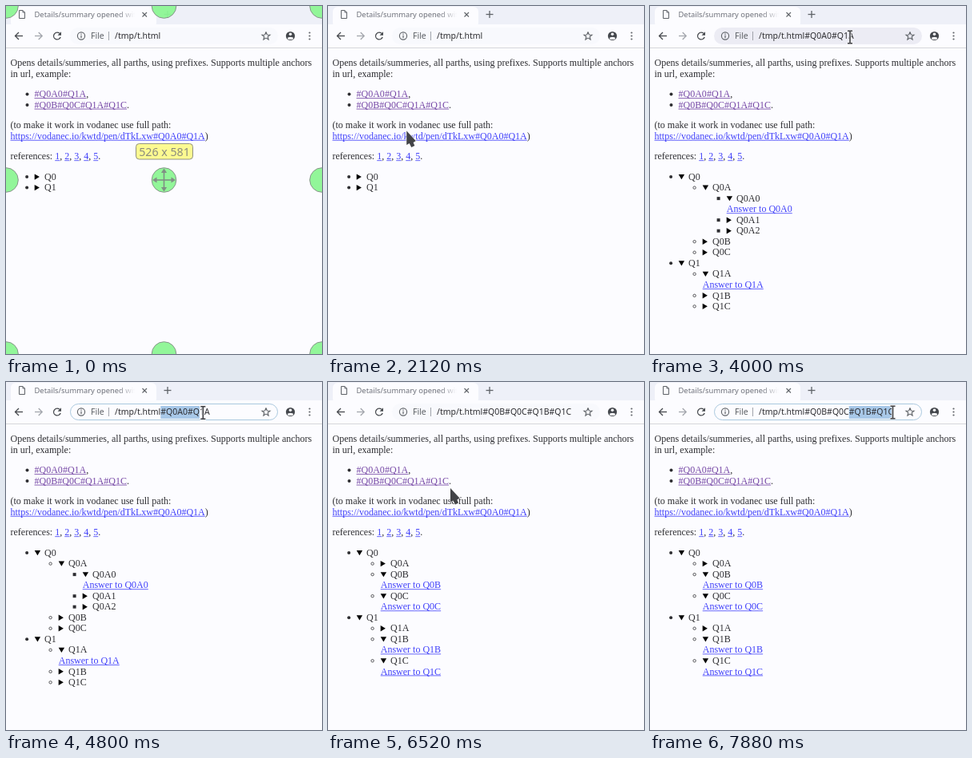
Write an HTML page with a canvas that moves like this. It is 395 px wide and 436 px high and loops after 8 s.

```html
<!DOCTYPE html>
<html lang="en">
<head>
<meta charset="utf-8">
<title>Details/summary</title>
<style>
html, body { margin: 0; width: 395px; height: 436px; overflow: hidden; background: #fcfcff; }
canvas { display: block; }
</style>
</head>
<body>
<canvas id="stage" width="395" height="436"></canvas>
<script>
const ctx = document.getElementById('stage').getContext('2d');
const LOOP = 8000, STEP = 40, LINE = 13.52, LEFT = 5.5;
const SERIF = '12.02px "Liberation Serif", "Times New Roman", serif';
const sans = size => size + 'px "Noto Sans", "Open Sans", sans-serif';
const INK = '#2e2e32', GREY = '#5f6368', BLUE = '#4040fa', PURPLE = '#7648a6', PAPER = '#fcfcff';
const URL_X = 136, URL_FONT = sans(10.51);

// depth, state, label: o = open, c = closed, a = answer link
const TREES = [
  ['0cQ0', '0cQ1'],
  ['0oQ0', '1oQ0A', '2oQ0A0', '2aQ0A0', '2cQ0A1', '2cQ0A2', '1cQ0B', '1cQ0C',
   '0oQ1', '1oQ1A', '1aQ1A', '1cQ1B', '1cQ1C'],
  ['0oQ0', '1cQ0A', '1oQ0B', '1aQ0B', '1oQ0C', '1aQ0C',
   '0oQ1', '1cQ1A', '1oQ1B', '1aQ1B', '1oQ1C', '1aQ1C']
];
const HASHES = ['', '#Q0A0#Q1A', '#Q0B#Q0C#Q1B#Q1C'];

// pointer path: time, x, y
const PATH = [
  [1040, 250, 445], [1400, 156, 305.5], [1800, 105, 185], [1880, 105, 185],
  [2520, 87, 109], [3600, 87, 109], [4000, 250, 39], [4360, 194, 39],
  [4720, 194, 39], [4800, 246.3, 38.5], [4880, 257, 39], [4920, 257, 39],
  [5360, 145, 125], [6320, 145, 125], [6520, 153, 133], [7120, 249, 39],
  [7160, 249, 39], [7880, 303.5, 38], [8000, 303.5, 38]
];

function pointer(t) {
  if (t < PATH[0][0]) return null;
  const i = PATH.findIndex(p => p[0] > t);
  const a = PATH[i - 1], b = PATH[i];
  const k = (t - a[0]) / (b[0] - a[0]);
  return { x: a[1] + (b[1] - a[1]) * k, y: a[2] + (b[2] - a[2]) * k };
}

function text(str, x, y, color, font) {
  ctx.font = font;
  ctx.fillStyle = color;
  ctx.fillText(str, x, y);
  return x + ctx.measureText(str).width;
}
const body = (str, x, y) => text(str, x, y, INK, SERIF);
function link(str, x, y, color = BLUE) {
  const end = text(str, x, y, color, SERIF);
  ctx.fillRect(x, y + 1, end - x, 0.8);
  return end;
}

function line(points, color, width = 1.3) {
  ctx.beginPath();
  points.forEach(([x, y], i) => i ? ctx.lineTo(x, y) : ctx.moveTo(x, y));
  ctx.strokeStyle = color;
  ctx.lineWidth = width;
  ctx.stroke();
}
function shape(points, color) {
  ctx.beginPath();
  points.forEach(([x, y]) => ctx.lineTo(x, y));
  ctx.closePath();
  ctx.fillStyle = color;
  ctx.fill();
}
function circle(x, y, r, fill, stroke, width = 1) {
  ctx.beginPath();
  ctx.arc(x, y, r, 0, Math.PI * 2);
  if (fill) { ctx.fillStyle = fill; ctx.fill(); }
  if (stroke) { ctx.strokeStyle = stroke; ctx.lineWidth = width; ctx.stroke(); }
}
function pill(x, y, w, h, r, fill, stroke) {
  ctx.beginPath();
  ctx.roundRect(x, y, w, h, r);
  ctx.fillStyle = fill;
  ctx.fill();
  if (stroke) { ctx.strokeStyle = stroke; ctx.lineWidth = 1; ctx.stroke(); }
}

function drawTabs() {
  ctx.fillStyle = '#eef0f8';
  ctx.fillRect(0, 0, 395, 24);
  pill(6, 1, 182, 26, 6, PAPER);
  ctx.fillStyle = PAPER;
  ctx.fillRect(0, 23, 395, 30);
  // page icon
  line([[21, 5.5], [16.5, 5.5], [16.5, 15.5], [23.5, 15.5], [23.5, 8], [21, 5.5], [21, 8], [23.5, 8]], GREY, 1);
  const fade = ctx.createLinearGradient(140, 0, 161, 0);
  fade.addColorStop(0, '#6c6f78');
  fade.addColorStop(1, 'rgba(108,111,120,0)');
  text('Details/summary opened wit', 35.5, 14, fade, sans(9.4));
  line([[170.5, 8], [176, 13.5]], GREY, 1.1);
  line([[176, 8], [170.5, 13.5]], GREY, 1.1);
  line([[197.5, 10.5], [206.5, 10.5]], GREY);
  line([[202, 6], [202, 15]], GREY);
}

function drawStar(x, y) {
  const pts = [];
  for (let i = 0; i <= 10; i++) {
    const r = i % 2 ? 2.3 : 5.3, a = i * Math.PI / 5 - Math.PI / 2;
    pts.push([x + r * Math.cos(a), y + r * Math.sin(a)]);
  }
  line(pts, GREY, 1.1);
}

function drawToolbar(page, p, sel, focused) {
  const dark = '#45484d';
  line([[21, 37.5], [11.5, 37.5]], dark);
  line([[16, 33], [11.5, 37.5], [16, 42]], dark);
  line([[36, 37.5], [45, 37.5]], '#a3a6ad');
  line([[40.7, 33], [45.2, 37.5], [40.7, 42]], '#a3a6ad');
  ctx.beginPath();
  ctx.arc(64, 37.5, 4.4, 0.35, 5.5);
  ctx.strokeStyle = dark;
  ctx.lineWidth = 1.3;
  ctx.stroke();
  shape([[69, 32.3], [69, 36.8], [64.5, 36.8]], dark);

  const over = p && p.y > 27 && p.y < 48 && p.x > 80 && p.x < 340;
  if (focused) pill(80.5, 27.5, 259, 20, 10, PAPER, '#a9c8de');
  else pill(80, 27, 260, 21, 10.5, over ? '#ececf4' : '#f8f9fd');
  circle(94, 37.5, 4.6, null, GREY, 1.1);
  ctx.fillStyle = GREY;
  ctx.fillRect(93.4, 36.7, 1.2, 3.4);
  ctx.fillRect(93.4, 34.6, 1.2, 1.2);
  text('File', 106, 41, GREY, URL_FONT);
  ctx.fillStyle = '#a0a3ab';
  ctx.fillRect(128, 32, 1, 11);

  const url = '/tmp/t.html' + HASHES[page];
  ctx.font = URL_FONT;
  const at = n => URL_X + ctx.measureText(url.slice(0, n)).width;
  if (sel) {
    let end = sel.from;
    while (end < url.length && at(end + 1) <= sel.x + 1.2) end++;
    ctx.fillStyle = '#a8c8e8';
    ctx.fillRect(at(sel.from), 30, at(end) - at(sel.from), 16);
  }
  text(url, URL_X, 41, INK, URL_FONT);

  drawStar(325, 37.8);
  circle(355.5, 37.5, 5.6, '#45484d');
  circle(355.5, 35.3, 1.8, PAPER);
  ctx.beginPath();
  ctx.ellipse(355.5, 40.4, 3.5, 1.6, 0, 0, Math.PI * 2);
  ctx.fillStyle = PAPER;
  ctx.fill();
  [33.5, 37.5, 41.5].forEach(y => circle(379.5, y, 1.1, GREY));
  ctx.fillStyle = '#d6d7da';
  ctx.fillRect(0, 52, 395, 1);
}

function drawRow(row, y) {
  const depth = +row[0], kind = row[1], name = row.slice(2), x = 35.7 + depth * 30;
  if (kind === 'a') { link('Answer to ' + name, x, y); return; }
  const my = y - 3.7, bx = x - 9.6;
  if (depth === 0) circle(bx, my, 2, INK);
  else if (depth === 1) circle(bx - 0.5, my, 1.7, null, INK, 0.8);
  else { ctx.fillStyle = INK; ctx.fillRect(bx - 2.5, my - 2, 4, 4); }
  if (kind === 'o') shape([[x, my - 3], [x + 7.4, my - 3], [x + 3.7, my + 3.2]], '#000');
  else shape([[x, my - 3.7], [x + 6.2, my], [x, my + 3.7]], '#000');
  body(name, x + 12.4, y);
}

function drawPage(page) {
  body('Opens details/summeries, all parths, using prefixes. Supports multiple anchors', LEFT, 75.2);
  body('in url, example:', LEFT, 88.7);
  circle(26.5, 110.5, 2, INK);
  circle(26.5, 124, 2, INK);
  body(',', link('#Q0A0#Q1A', 35.5, 114.2, PURPLE), 114.2);
  body('.', link('#Q0B#Q0C#Q1A#Q1C', 35.5, 127.7, PURPLE), 127.7);
  body('(to make it work in vodanec use full path:', LEFT, 153.2);
  body(')', link('https://vodanec.io/kwtd/pen/dTkLxw#Q0A0#Q1A', LEFT, 166.8), 166.8);
  let x = body('references: ', LEFT, 192.3);
  for (let n = 1; n <= 5; n++) x = body(n < 5 ? ', ' : '.', link(String(n), x, 192.3), 192.3);
  TREES[page].forEach((row, i) => drawRow(row, 217.8 + i * LINE));
}

function drawResize(alpha) {
  ctx.save();
  ctx.globalAlpha = alpha * 0.95;
  for (const y of [0, 218, 436])
    for (const x of [0, 197.5, 395]) circle(x, y, 15.3, '#8cf594', '#858f88');
  for (let i = 0; i < 4; i++) {
    ctx.save();
    ctx.translate(197.5, 218);
    ctx.rotate(i * Math.PI / 2);
    line([[0, 0], [10, 0]], '#808a84', 1.6);
    shape([[9, -3.6], [14.5, 0], [9, 3.6]], '#808a84');
    ctx.restore();
  }
  pill(162.5, 172.5, 71, 19.5, 4, '#fcfa8c', '#8c8c80');
  ctx.textAlign = 'center';
  text('526 x 581', 198, 187.6, '#85857c', sans(14.2));
  ctx.restore();
}

function outlined(path, width) {
  ctx.strokeStyle = '#f2f2f4';
  ctx.lineWidth = width * 2;
  ctx.lineJoin = 'round';
  ctx.stroke(path);
  ctx.fillStyle = '#424347';
  ctx.fill(path);
}
const ARROW = new Path2D('M0 0V17.5L3.5 15.5L6 20.5L10 18.5L8.3 14.5L11.5 12.5Z');
const HAND = new Path2D('M-2 1.5Q0 -1.5 2 1.5V8H9Q11 8.5 11 11V17Q10.5 20 9 21V24H-2V21' +
  'L-7.5 13.5Q-8.5 10.5 -6 10.5L-2 14Z');
const BEAM = new Path2D('M-3 -8.5H3V-7H0.8V7H3V8.5H-3V7H-0.8V-7H-3Z');

function drawPointer(p) {
  const inUrl = p.y > 28 && p.y < 48 && p.x > 85 && p.x < 316;
  const onLink = p.x > 36 && (p.y > 104 && p.y < 117 && p.x < 101 || p.y >= 117 && p.y < 131 && p.x < 151);
  ctx.save();
  ctx.translate(p.x, p.y);
  outlined(inUrl ? BEAM : onLink ? HAND : ARROW, inUrl ? 0.8 : 0.6);
  ctx.restore();
}

function selection(t, p) {
  if (t >= 4720 && t < 5960) return { from: 11, x: t > 4880 ? 260 : p.x };
  if (t >= 7160) return { from: 19, x: p.x };
  return null;
}

function draw(now) {
  const t = Math.floor(now % LOOP / STEP) * STEP;
  const page = t < 2800 ? 0 : t < 5960 ? 1 : 2;
  const p = pointer(t);
  const focused = t >= 4480 && t < 5960 || t >= 7160;
  ctx.fillStyle = PAPER;
  ctx.fillRect(0, 0, 395, 436);
  drawTabs();
  drawToolbar(page, p, selection(t, p), focused);
  drawPage(page);
  if (t < 280) drawResize(Math.min(1, (280 - t) / 240));
  if (p) drawPointer(p);
}

const start = performance.now();
function tick() {
  draw(performance.now() - start);
  requestAnimationFrame(tick);
}
tick();
</script>
</body>
</html>
```
